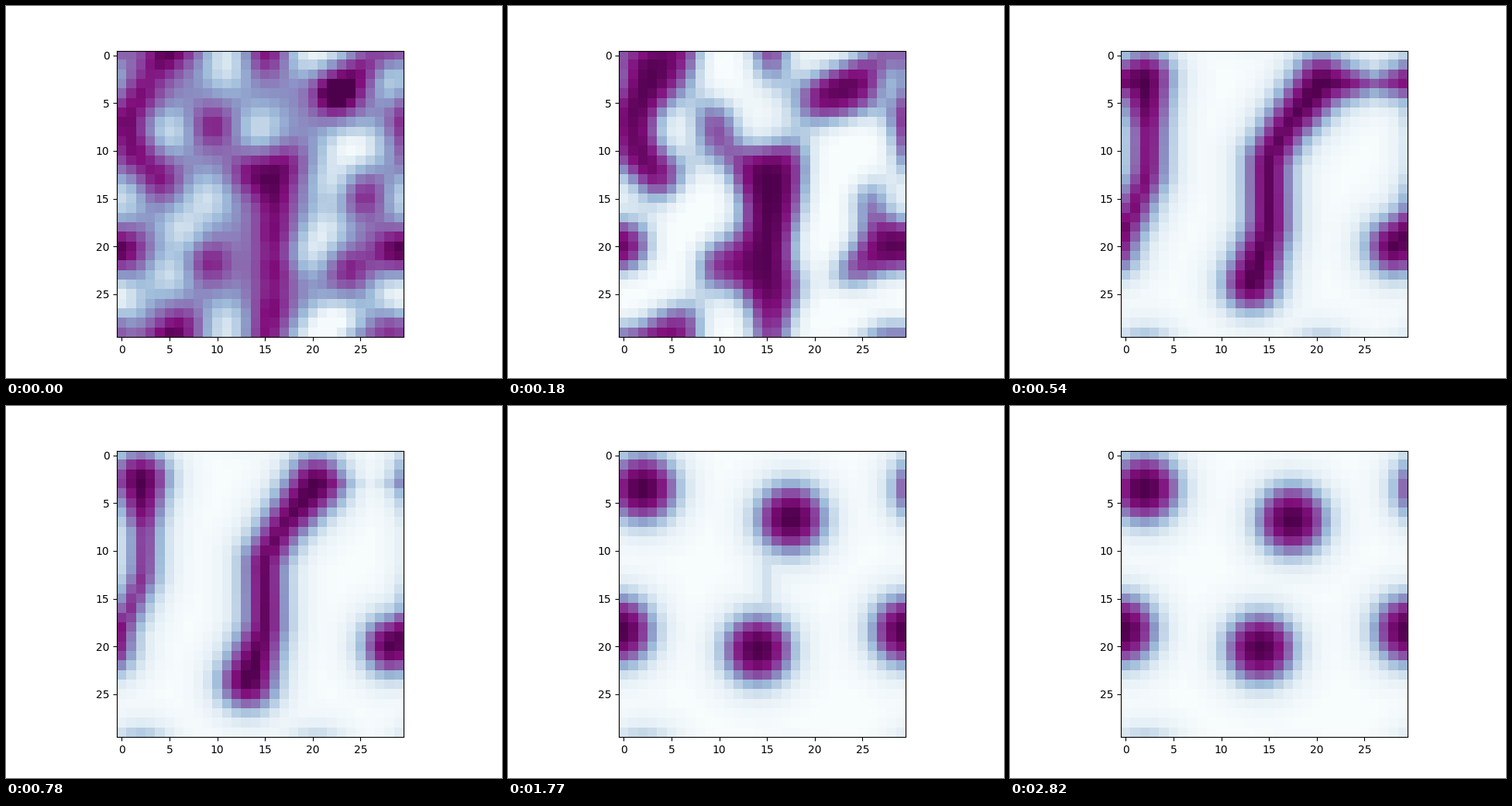
Write a matplotlib script that moves like this. It is 640 px wide and 480 px high and loops after 2970 ms.

```python
import numpy as np
import matplotlib.pyplot as plt
from matplotlib.animation import FuncAnimation

N = 30
FRAMES = 99
INTERVAL = 30
X, Y = np.meshgrid(np.arange(N), np.arange(N))

# Centres of the dense and thin patches in the first mixture
DENSE = [(22, 4), (23, 4), (25.4, 1.4), (.7, 20.3), (28, 20.5), (23.7, 22.5),
         (16, 18.7), (16, 22.5), (15.7, 26.5), (15, 0), (16, 15), (17, 11.5),
         (13.5, 12.3), (9.5, 7.5), (4, 13), (1.5, 10.2), (.2, 7), (2, 4),
         (4, .5), (6.2, 28.5), (9.2, 21.7), (25.3, 14.7), (28.5, 28.7)]
THIN = [(23, 9.8), (25.5, 9.5), (0, 15), (9, 15), (11, 1.5), (5, 8),
        (14.5, 7.7), (19.5, 0), (28.2, 2.5), (21.5, 18), (19.8, 20.7),
        (21.3, 28), (23.3, 27.8), (28, 25), (5, 23), (11, 28), (.3, 25.8),
        (22, 13.4), (6.3, 18.3)]

# Drop centres when the drops first show and when they have come to rest
DROPS = np.array([[(2, 2.5), (-1.8, 20), (20.5, 2.8), (13.2, 23.8)],
                  [(2, 3.5), (-.4, 18.3), (17.4, 6.8), (14.1, 20.2)]])
LEFT_TOP, LEFT_LOW, MID_TOP, MID_LOW = range(4)

# Necks: first drop, points between, last drop, its x wrap, width, break time
NECKS = [
    (LEFT_TOP, [(2.4, 8), (2.3, 12.5), (.5, 17)], LEFT_LOW, 0, 2.2, 30),
    (MID_TOP, [(16.8, 7.5), (14.9, 11), (15, 18)], MID_LOW, 0, 2.4, 54),
    (MID_TOP, [(26, 3)], LEFT_TOP, N, 1.0, 22),
]
FORMED = 18
SUBSTEPS = 4
DT = .35 / SUBSTEPS


def patches(centres):
    total = np.zeros((N, N))
    for x, y in centres:
        dx = (X - x + N / 2) % N - N / 2
        dy = (Y - y + N / 2) % N - N / 2
        total += np.exp(-(dx ** 2 + dy ** 2) / (2 * 1.7 ** 2))
    return total


def stroke(p, q):
    """Depth inside a tapered stroke on the periodic grid."""
    (x0, y0, r0), (x1, y1, r1) = p, q
    ux, uy = x1 - x0, y1 - y0
    length2 = max(ux * ux + uy * uy, 1e-9)
    best = np.full((N, N), -99.0)
    for sx in (-N, 0, N):
        for sy in (-N, 0, N):
            dx, dy = X - x0 - sx, Y - y0 - sy
            s = np.clip((dx * ux + dy * uy) / length2, 0, 1)
            depth = r0 + (r1 - r0) * s - np.hypot(dx - s * ux, dy - s * uy)
            best = np.maximum(best, depth)
    return best


def neck_radius(width, break_time, t):
    """Pinch off with a cube-root law, then draw apart."""
    left = 1 - t / break_time
    return width * np.cbrt(left) if left > 0 else 12 * left


def goal(t):
    """Drops and the necks between them at frame time t, from -1 to 1."""
    t = max(t, FORMED)
    u = np.clip((t - 20) / 44, 0, 1)
    u = u * u * (3 - 2 * u)
    radius = 2.7 + .7 * u
    drops = [(x, y, radius) for x, y in DROPS[0] + (DROPS[1] - DROPS[0]) * u]
    depth = np.max([stroke(d, d) for d in drops], axis=0)
    for first, between, last, wrap, width, break_time in NECKS:
        r = neck_radius(width, break_time, t)
        x, y, end = drops[last]
        path = [drops[first]] + [(a, b, r) for a, b in between]
        path.append((x + wrap, y, end))
        for p, q in zip(path, path[1:]):
            depth = np.maximum(depth, stroke(p, q))
    return np.tanh(depth / (1 + np.abs(depth) / 12) / 1.75)


def laplacian(f):
    return sum(np.roll(f, s, axis) for s in (-1, 1) for axis in (0, 1)) - 4 * f


def evolve():
    """Phase separation that settles into the drops."""
    v = .52 + .33 * (patches(DENSE) - patches(THIN))
    phi = 2 * np.clip(v, .01, 1) - 1
    states = [phi]
    for t in range(1, FRAMES):
        aim = goal(t)
        pull = 6 * min(t / FORMED, 1) ** 3
        for _ in range(SUBSTEPS):
            rate = .75 * laplacian(phi) + phi - phi ** 3 - .15
            phi = phi + DT * (rate + pull * (aim - phi))
        states.append(phi)
    return states


def density(phi):
    v = np.clip((1 + phi) / 2, 0, None)
    return v / v.max()


STATES = evolve()
fig, ax = plt.subplots(figsize=(6.4, 4.8), dpi=100)
image = ax.imshow(density(STATES[0]), cmap="BuPu", vmin=0, vmax=1)


def update(i):
    image.set_data(density(STATES[i]))
    return [image]


anim = FuncAnimation(fig, update, frames=FRAMES, interval=INTERVAL,
                     repeat=True, repeat_delay=0)
plt.show()
```
